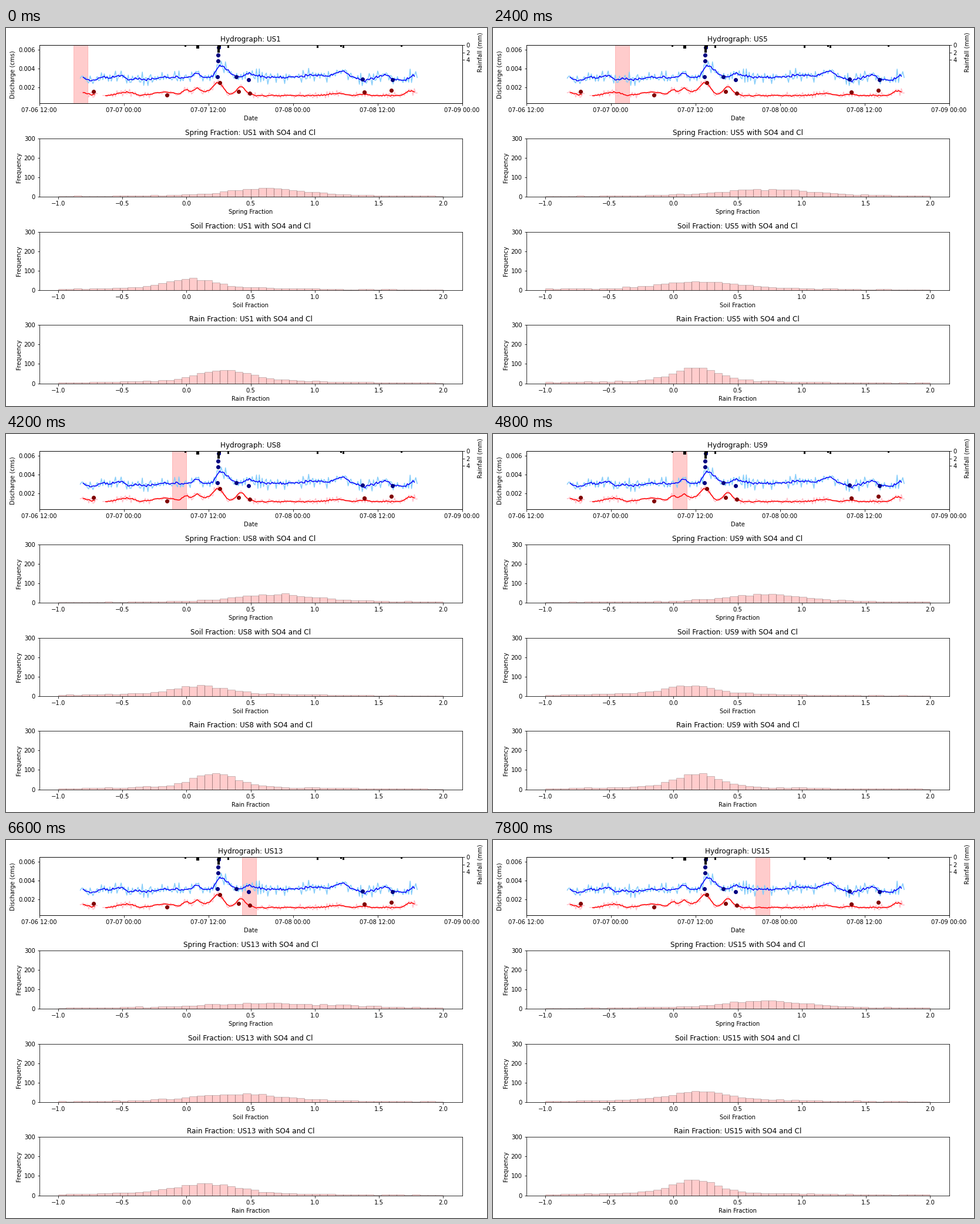
A matplotlib script for the animation above (8 s loop, 819 by 643 pixels).

```python
import numpy as np
import matplotlib.pyplot as plt
from matplotlib.animation import FuncAnimation

W, H, DPI = 819, 643, 72
LEFT, WIDTH, TOP, HEIGHT, PITCH = 56.55, 720, 29.25, 99.2, 158.7
STEP_MS, TICK_MS, LOOP_MS = 600, 200, 8000
LABELS = [*range(1, 10), *range(11, 16)]

# Key samples; everything in between is interpolated
KEYS = [1, 3, 5, 8, 11, 13, 15]
SPAN_X = [115, 162, 208, 283, 351, 402, 447]

# Per fraction: peak centre and height at the key samples, area of the peak
FRACTIONS = {
    "Spring": ([.62, .60, .75, .70, .78, .65, .72], [30, 30, 22, 25, 31, 12, 25], 10),
    "Soil": ([.05, .08, .22, .12, .12, .40, .20], [42, 45, 30, 38, 45, 26, 37], 10.5),
    "Rain": ([.30, .28, .18, .22, .12, .13, .16], [53, 57, 62, 63, 65, 46, 64], 15),
}
BINS, BIN = 50, 0.06

# Bumps of the flow curves on the stage: x, lift, width
BLUE_BUMPS = [(147, -6, 10), (196, 4, 8), (211, -5, 7), (240, -4, 16), (325, 9, 6),
              (365, 25, 7), (378, 11, 8), (411, 7, 7), (428, 4, 10), (525, 4, 25),
              (571, 11, 14), (611, -6, 13), (644, 5, 8), (671, -5, 13), (699, 4, 8)]
RED_BUMPS = [(131, 7, 5), (148, 3, 6), (200, 6, 14), (217, 4, 5), (270, 6, 25),
             (307, 12, 6), (326, 14, 9), (344, 6, 7), (359, 24, 9), (371, 8, 7),
             (400, 17, 10), (565, 4, 15), (608, 3, 9), (690, 9, 11)]
BLUE_DOTS = [(361, 33), (360, 46), (360, 56), (359, 83),
             (391, 83), (412, 88), (606, 87), (657, 88)]
RED_DOTS = [(148, 108), (273, 114), (363, 93), (395, 108),
            (414, 111), (609, 109), (655, 106)]
# Centre x, width in px, rainfall in mm
RAIN_BARS = [(305.5, 3, .4), (326.5, 5, .9), (362, 4, 2), (365, 2, .5), (378.5, 3, .8),
             (530.5, 3, .8), (570.5, 2.5, .4), (574.5, 3, .8), (673.5, 3, .4)]


def hours(x):
    return (np.asarray(x) - LEFT) / 12


def flow(y):
    return 0.006 - (np.asarray(y) - 37) / 16000


def counts(label, centers, peaks, area, rng):
    """A narrow peak on a broad tail, with counting noise."""
    center, peak = np.interp(label, KEYS, centers), np.interp(label, KEYS, peaks)
    d = -1 + BIN * (np.arange(BINS) + 0.5) - center
    values = peak * np.exp(-(d * peak / area) ** 2) + 17 / (1 + (d / 0.85) ** 2)
    noise = rng.normal(0, 0.4, BINS) * np.sqrt(values)
    return np.round(np.clip(values + noise, 0, None))


def panel(row):
    bottom = H - TOP - HEIGHT - row * PITCH
    return fig.add_axes([LEFT / W, bottom / H, WIDTH / W, HEIGHT / H])


def draw_flow(base, bumps, spread, low, raw_color, color, gap=(0, 0)):
    """Jagged readings and their running mean over five."""
    x = np.arange(126.5, 702, 2.4)
    level = base - sum(lift * np.exp(-((x - at) / w) ** 2) for at, lift, w in bumps)
    raw = np.minimum(level + spread * np.diff(rng.normal(size=x.size + 1)), low)
    raw[(x > gap[0]) & (x < gap[1])] = np.nan
    mean = np.convolve(raw, np.ones(5) / 5, "valid")
    hydro.plot(hours(x), flow(raw), color=raw_color, lw=1.5, zorder=2)
    hydro.plot(hours(x[2:-2]), flow(mean), color=color, lw=1.5, zorder=2.1)


fig = plt.figure(figsize=((W + 0.001) / DPI, (H + 0.001) / DPI), dpi=DPI, facecolor="white")
rng = np.random.default_rng(7)

hydro = panel(0)
draw_flow(84, BLUE_BUMPS, 4.2, 98, "lightskyblue", "blue")
draw_flow(115, RED_BUMPS, 2.2, 119, "pink", "red", gap=(157, 163))
for dots, color in ((BLUE_DOTS, "navy"), (RED_DOTS, "maroon")):
    xs, ys = np.array(dots).T
    hydro.plot(hours(xs + 0.5), flow(ys), "o", color=color, ms=6, zorder=3)
span = hydro.axvspan(0, 2, color="red", alpha=0.2)
hydro.set_xlim(0, 60)
hydro.set_ylim(flow(TOP + HEIGHT), flow(TOP))
hydro.set_yticks([0.002, 0.004, 0.006])
hydro.set_xticks(range(0, 61, 12), ["07-06 12:00", "07-07 00:00", "07-07 12:00",
                                    "07-08 00:00", "07-08 12:00", "07-09 00:00"])
hydro.set_xlabel("Date")
hydro.set_ylabel("Discharge (cms)")

rain_axis = hydro.twinx()
xs, widths, depths = np.array(RAIN_BARS).T
rain_axis.bar(hours(xs), depths, widths / 12, color="black")
rain_axis.set_ylim(16, 0)
rain_axis.set_yticks([0, 2, 4])
fig.text(807 / W, 1 - 41 / H, "Rainfall (mm)", rotation=90, ha="center", va="center")

charts = []
for row, (name, shape) in enumerate(FRACTIONS.items(), start=1):
    ax = panel(row)
    bars = ax.bar(-1 + BIN * np.arange(BINS), np.zeros(BINS), BIN, align="edge",
                  color="red", edgecolor="black", lw=1, alpha=0.2)
    ax.set_xlim(-1.15, 2.15)
    ax.set_ylim(0, 300)
    ax.set_xticks(np.arange(-1, 2.1, 0.5))
    ax.set_yticks([0, 100, 200, 300])
    ax.set_xlabel(f"{name} Fraction")
    ax.set_ylabel("Frequency")
    charts.append((ax, name, bars, [counts(label, *shape, rng) for label in LABELS]))


def update(i):
    step = i * TICK_MS // STEP_MS
    number = LABELS[step]
    hydro.set_title(f"Hydrograph: US{number}")
    span.set_x(hours(np.interp(number, KEYS, SPAN_X)))
    for ax, name, bars, heights in charts:
        ax.set_title(f"{name} Fraction: US{number} with SO4 and Cl")
        for bar, height in zip(bars, heights[step]):
            bar.set_height(height)
    return []


anim = FuncAnimation(fig, update, frames=LOOP_MS // TICK_MS, interval=TICK_MS,
                     init_func=lambda: update(0), repeat=True, repeat_delay=0, blit=False)
plt.show()
```
